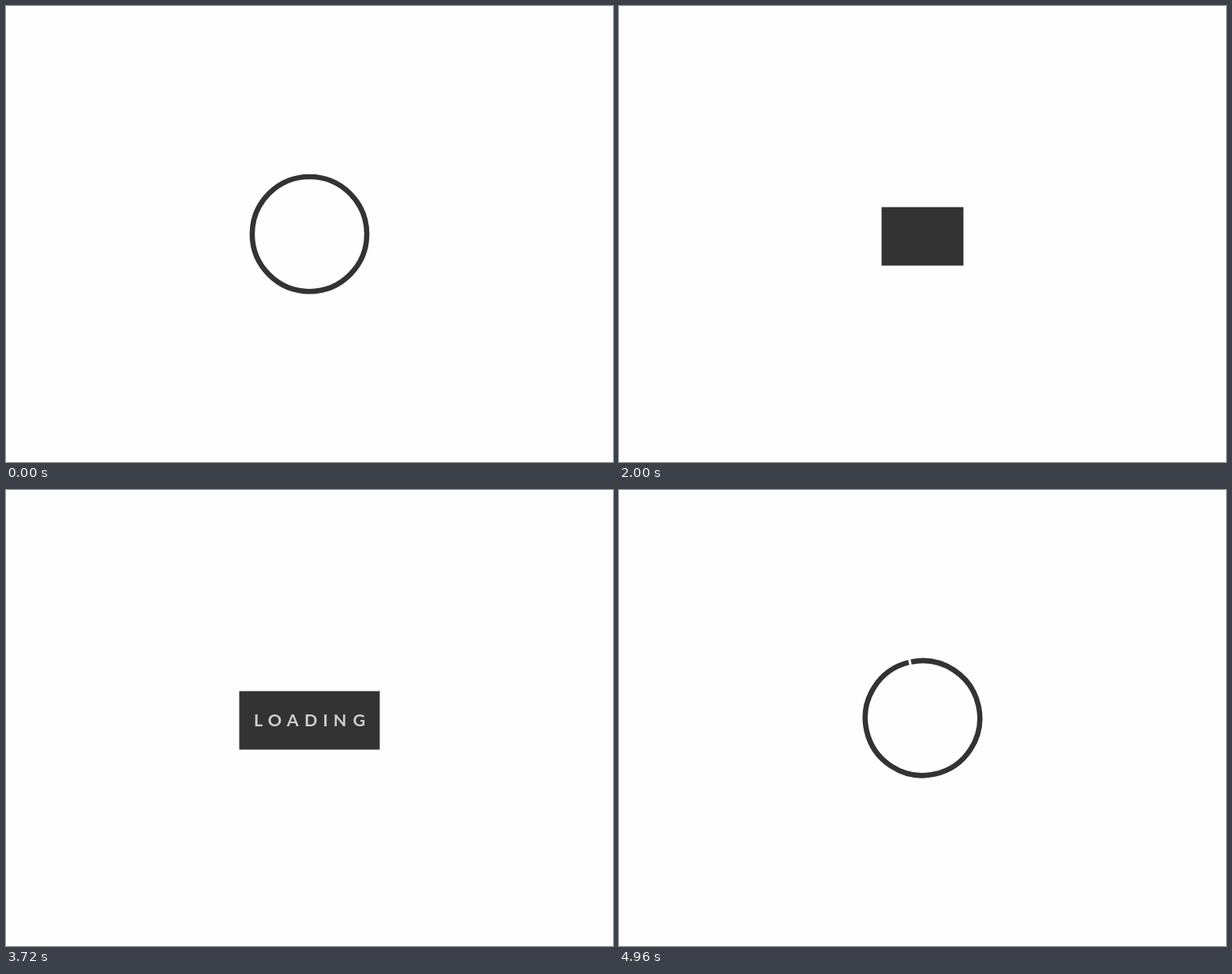
Recreate the animation shown at these times as an HTML page. Size 769 px wide and 577 px high, loop 5 s.

```html
<!DOCTYPE html>
<html>
<head>
<meta charset="utf-8">
<style>
  html, body { margin: 0; width: 100%; height: 100%; overflow: hidden; background: #fefefe; }
  svg { display: block; }
  path { fill: none; stroke: #333; stroke-width: 6.6; }
  text { font: bold 21.6px Lato, sans-serif; text-anchor: middle; fill: #fff; }
</style>
</head>
<body>
<svg width="769" height="577" viewBox="0 0 769 577">
  <clipPath id="clip"><rect class="box" y="254.5" height="74"/></clipPath>
  <!-- two laps of the ring, then a curl up into the upright line -->
  <path id="unroll" d="M384.5 216a72.6 72.6 0 0 1 0 145.2a72.6 72.6 0 0 1 0 -145.2a72.6 72.6 0 0 1 72.6 72.6
    C457.1 329 436 353 412 353C396 353 384.5 340 384.5 322V254.5"/>
  <!-- the line curls out to the right and winds back into the ring -->
  <path id="roll" d="M384.5 328.5V255C384.5 237 396 224 412 224C436 224 457.1 248 457.1 288.6
    A72.6 72.6 0 1 1 369.3 217.6A72.6 72.6 0 0 1 399.7 359.6A72.6 72.6 0 0 1 369.3 217.6"/>
  <rect class="box" id="panel" y="254.5" height="74" fill="#333"/>
  <g id="word" clip-path="url(#clip)"></g>
</svg>
<script>
const LOOP = 5000, STEP = 40, LINE = 74, LAP = 2 * Math.PI * 72.6;
const CENTER = 384.5, THIN = 6.6, WIDE = 178, OVER = 185;
const $ = id => document.getElementById(id);
const unroll = $('unroll'), roll = $('roll'), panel = $('panel'), word = $('word');
const boxes = document.querySelectorAll('.box');
const unrollLen = unroll.getTotalLength(), rollLen = roll.getTotalLength();

const letterX = [319.7, 340.4, 363.3, 386.2, 404.7, 423, 447.4];
const letters = [...'LOADING'].map((char, i) => {
  const el = document.createElementNS('http://www.w3.org/2000/svg', 'text');
  el.textContent = char;
  el.setAttribute('x', letterX[i]);
  word.append(el);
  return el;
});

const progress = (t, from, to) => Math.min(1, Math.max(0, (t - from) / (to - from)));
const smooth = x => x * x * (3 - 2 * x);
const tween = (t, from, to, a, b) => a + (b - a) * smooth(progress(t, from, to));
const show = (el, on) => el.style.display = on ? '' : 'none';

function trim(path, tail, head) {
  path.style.strokeDasharray = `0 ${tail} ${head - tail} 9999`;
}

function boxWidth(t) {
  if (t < 2213) return tween(t, 1760, 2213, THIN, OVER);
  if (t < 3000) return tween(t, 2213, 2310, OVER, WIDE);
  return tween(t, 3720, 3960, WIDE, THIN);
}

function draw(t) {
  const boxed = t > 1765 && t < 3960;
  show(unroll, t <= 1765);
  show(roll, t >= 3960);
  show(panel, boxed);
  show(word, boxed);

  trim(unroll,
    tween(t, 80, 1608, 0, unrollLen - LINE),
    tween(t, 80, 1765, LAP, unrollLen));
  trim(roll,
    tween(t, 3960, 4800, 0, rollLen - LAP),
    tween(t, 3960, 5000, LINE, rollLen));

  const width = boxWidth(t);
  for (const box of boxes) {
    box.setAttribute('x', CENTER - width / 2);
    box.setAttribute('width', width);
  }

  const fade = 1 - progress(t, 3680, 3850);
  letters.forEach((el, i) => {
    const p = progress(t, 2220 + i * 70, 2420 + i * 70);
    el.setAttribute('y', 298.5 + 7 * (1 - smooth(p)));
    el.style.opacity = Math.min(1, p * 1.8) * fade;
  });
}

const start = performance.now();
function tick() {
  const t = (performance.now() - start) % LOOP;
  draw(Math.floor(t / STEP) * STEP);
  requestAnimationFrame(tick);
}
tick();
</script>
</body>
</html>
```
